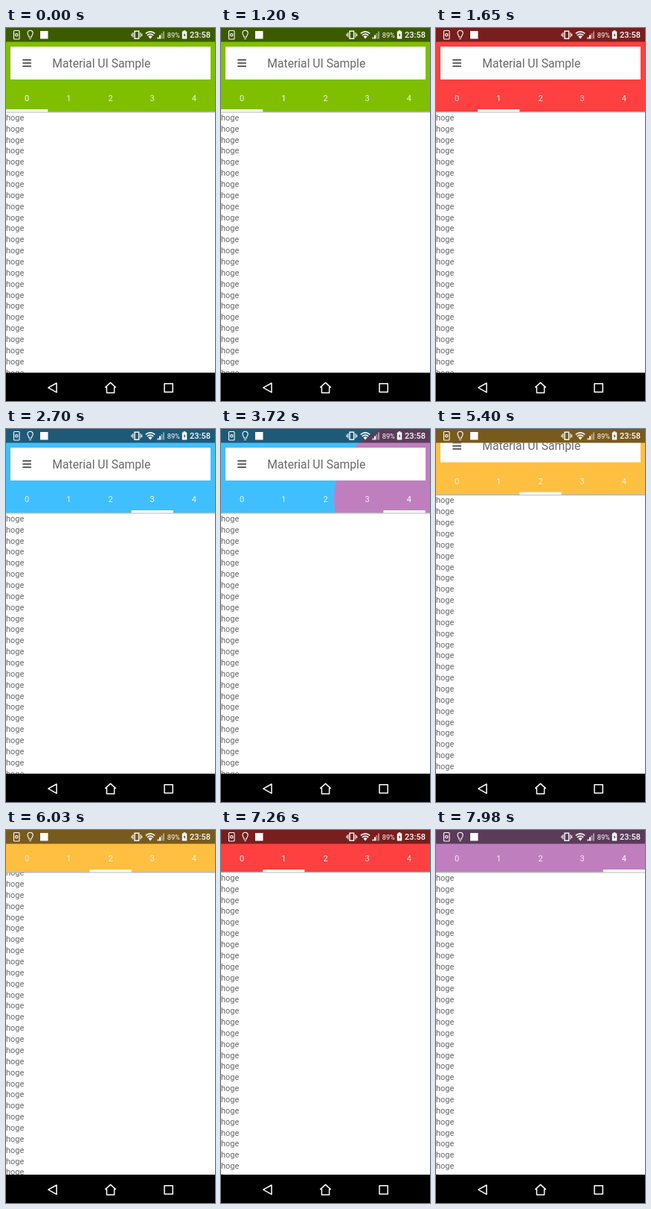
An HTML page that plays this animation: 281 by 500 pixels, repeating every 8000 ms.

```html
<!DOCTYPE html>
<html lang="en">
<head>
<meta charset="utf-8">
<title>Material UI Sample</title>
<style>
  html, body { margin: 0; width: 100%; height: 100%; overflow: hidden; background: #fff; }
  svg { display: block; width: 281px; height: 500px; font-family: Roboto, sans-serif; }
  .list { font-size: 11px; fill: #666; }
  .title { font-size: 15.7px; fill: #686868; }
  .tabs { font-size: 11px; fill: #fff; text-anchor: middle; }
  .tabs text { opacity: .85; }
  .tabs .on { opacity: 1; }
  .line { fill: none; stroke: #fff; }
</style>
</head>
<body>
<svg viewBox="0 0 281 500">
  <defs>
    <clipPath id="barClip"><rect id="barClipRect" width="281" height="112"/></clipPath>
    <clipPath id="belowStatus"><rect y="18.5" width="281" height="482"/></clipPath>
  </defs>
  <rect width="281" height="500" fill="#fff"/>
  <g class="list" id="list"></g>

  <g clip-path="url(#barClip)">
    <rect id="base" width="281" height="113"/>
    <circle id="reveal"/>
  </g>
  <g clip-path="url(#belowStatus)">
    <g id="header">
      <rect y="112" width="281" height="1.5" fill="#b9b9b9"/>
      <rect x="6" y="25" width="269" height="44" fill="#fff"/>
      <path d="M22.3 42.8h11.6M22.3 47h11.6M22.3 51.2h11.6" stroke="#333" stroke-width="1.5"/>
      <text class="title" x="62.3" y="52.8">Material UI Sample</text>
      <g class="tabs" id="tabs"></g>
      <rect id="mark" y="109" width="56.2" height="3.5" fill="#fff"/>
    </g>
  </g>

  <rect width="281" height="18.5" fill="#000" opacity=".53"/>
  <g class="line" stroke-width="1.1">
    <rect x="10.5" y="3.5" width="7.5" height="11.5" rx="1"/>
    <circle cx="14.2" cy="9.3" r="1.7"/>
    <path d="M31 12.2C31 10 29 9.4 29 6.8a3.6 3.6 0 0 1 7.2 0C36.2 9.4 34.2 10 34.2 12.2zM31.2 14.5h2.8"/>
    <rect x="173" y="4.2" width="5.6" height="10" stroke-width="1.4"/>
    <path d="M170.8 6v6.5M180.8 6v6.5M169 7.5v3.5M182.6 7.5v3.5"/>
    <path d="M187.8 7.4q6.2-5 12.4 0M189.8 9.8q4.2-3.4 8.4 0" stroke-width="1.7"/>
  </g>
  <g fill="#fff">
    <rect x="46" y="4" width="10.5" height="10.5"/>
    <path d="M191.3 11.2q2.7-2 5.4 0L194 14.5z"/>
    <path d="M203.5 14.5h2v-2h-2zM206 14.5h2v-5h-2z"/>
    <path d="M208.5 14.5h1.8V7h-1.8zM211 14.5h2V4.5h-2z" opacity=".45"/>
    <path d="M236.8 4.5h1.8V3.3h2.8v1.2h1.8v10h-6.4z"/>
    <text x="216.8" y="12.8" font-size="9.2">89%</text>
    <text x="247" y="13.4" font-size="11" font-weight="500">23:58</text>
  </g>
  <path d="M240.6 6l-2 4h1.5l-.5 3 2-4.2h-1.5z" fill="#444"/>

  <rect y="462" width="281" height="38" fill="#000"/>
  <g class="line" stroke-width="1.5" stroke-linejoin="round">
    <path d="M68 476v12.4L56.8 482.2z"/>
    <path d="M133.6 481.6l6.9-6.2 6.9 6.2h-1.8v7.4h-10.2v-7.4z"/>
    <rect x="213" y="476.8" width="11.2" height="11.2"/>
  </g>
</svg>
<script>
  const LOOP = 8000, TAB = 56.2, ROW = 14.86, COLLAPSE = 56;
  const SLIDE = 300, REVEAL = 450, RADIUS = 281;
  const COLORS = ['#80bf00', '#ff4040', '#ffbf40', '#40bfff', '#bf7fbf'];
  // [time, tab]
  const TAPS = [[0, 0], [1200, 1], [1650, 2], [2370, 3], [2760, 2], [3210, 3], [3537, 4],
    [4020, 3], [4440, 2], [6540, 0], [6960, 1], [7350, 3], [7590, 4]];
  const SCROLL = { start: 5280, length: 1020, distance: 141.2, reset: 6540 };

  const $ = id => document.getElementById(id);
  const set = (el, attrs) => { for (const k in attrs) el.setAttribute(k, attrs[k]); };
  const clamp = x => Math.min(1, Math.max(0, x));

  function addText(parent, text, x, y) {
    const el = document.createElementNS('http://www.w3.org/2000/svg', 'text');
    el.textContent = text;
    set(el, { x, y });
    parent.append(el);
    return el;
  }

  for (let i = 0; i < 40; i++) addText($('list'), 'hoge', 0, 123.8 + i * ROW);
  const tabs = COLORS.map((_, i) => addText($('tabs'), i, (i + .5) * TAB, 98));

  // cubic-bezier(.4, 0, .2, 1)
  function fastOutSlowIn(x) {
    let lo = 0, hi = 1;
    for (let i = 0; i < 20; i++) {
      const u = (lo + hi) / 2, v = 1 - u;
      if (1.2 * v * v * u + .6 * v * u * u + u ** 3 < x) lo = u; else hi = u;
    }
    return lo * lo * (3 - 2 * lo);
  }

  function draw(t) {
    const n = TAPS.findLastIndex(tap => tap[0] <= t);
    const [start, tab] = TAPS[n];
    const from = n ? TAPS[n - 1][1] : tab;
    const age = t - start;

    const s = clamp((t - SCROLL.start) / SCROLL.length);
    const moved = SCROLL.distance * (1 - (1 - s) ** 1.5);
    const shift = Math.min(moved, COLLAPSE);
    const listShift = t < SCROLL.reset ? moved : shift;

    const grow = (1 - Math.cos(Math.PI * clamp(age / REVEAL))) / 2;
    set($('base'), { fill: COLORS[from] });
    set($('reveal'), { cx: (tab + .5) * TAB, cy: 94 - shift, r: RADIUS * grow, fill: COLORS[tab] });
    set($('barClipRect'), { height: 112 - shift });
    set($('mark'), { x: TAB * (from + (tab - from) * fastOutSlowIn(clamp(age / SLIDE))) });
    set($('header'), { transform: `translate(0 ${-shift})` });
    set($('list'), { transform: `translate(0 ${-listShift})` });
    tabs.forEach((el, i) => el.classList.toggle('on', i === tab));
  }

  function tick() {
    draw(performance.now() % LOOP);
    requestAnimationFrame(tick);
  }
  tick();
</script>
</body>
</html>
```
